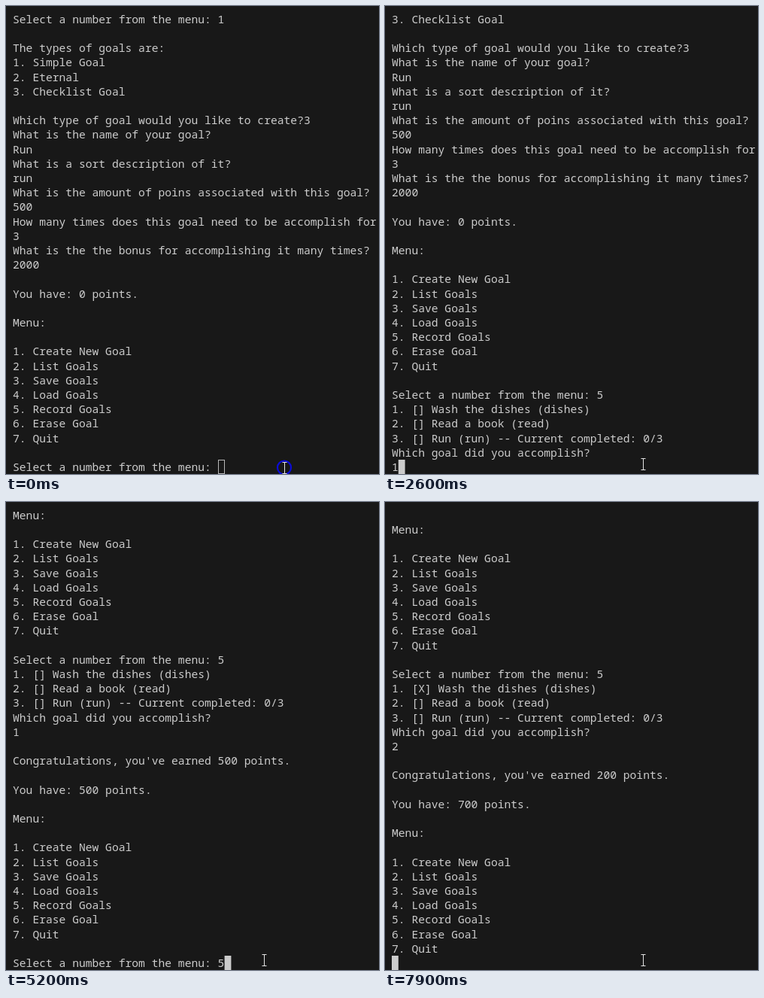
An HTML page with a canvas for the animation above (8000 ms loop, 496 by 622 pixels).

```html
<!DOCTYPE html>
<html lang="en">
<head>
<meta charset="utf-8">
<title>Goal tracker terminal</title>
<style>
  html, body { margin: 0; width: 100%; height: 100%; overflow: hidden; background: #181818; }
  canvas { display: block; }
</style>
</head>
<body>
<canvas id="stage" width="496" height="622"></canvas>
<script>
const ctx = document.getElementById('stage').getContext('2d');
const LOOP = 8000;
const ROWS = 32;
const LEFT = 9;
const CHAR = 8.8;
const LINE = 19.2;
const BASE = 22.8;
const PROMPT = 'Select a number from the menu: ';

const MENU = ['Menu:', '', '1. Create New Goal', '2. List Goals', '3. Save Goals',
  '4. Load Goals', '5. Record Goals', '6. Erase Goal', '7. Quit'];

const setup = [
  PROMPT + '1', '',
  'The types of goals are:', '1. Simple Goal', '2. Eternal', '3. Checklist Goal', '',
  'Which type of goal would you like to create?3',
  'What is the name of your goal?', 'Run',
  'What is a sort description of it?', 'run',
  'What is the amount of poins associated with this goal?', '500',
  'How many times does this goal need to be accomplish for', '3',
  'What is the the bonus for accomplishing it many times?', '2000', '',
  'You have: 0 points.', '', ...MENU, ''
];

const goals = mark => [
  `1. [${mark}] Wash the dishes (dishes)`, '2. [] Read a book (read)',
  '3. [] Run (run) -- Current completed: 0/3', 'Which goal did you accomplish?'
];

const reward = (earned, total) => [
  '', `Congratulations, you've earned ${earned} points.`, '',
  `You have: ${total} points.`, '', ...MENU
];

// Each step prints its output, then waits on a prompt until a key is typed.
const steps = [
  { at: 0, out: setup, prompt: PROMPT, key: '5', typed: 700 },
  { at: 1000, out: goals(''), prompt: '', key: '1', typed: 2000 },
  { at: 2700, out: [...reward(500, 500), ''], prompt: PROMPT, key: '5', typed: 4200 },
  { at: 5400, out: goals('X'), prompt: '', key: '2', typed: 7000 },
  { at: 7900, out: reward(200, 700), prompt: '', key: '', typed: LOOP }
];

function screenAt(t) {
  const lines = [];
  for (const s of steps) {
    if (t < s.at) break;
    if (lines.length) lines[lines.length - 1] = lines.input;
    lines.push(...s.out, s.prompt + (t >= s.typed ? s.key : ''));
    lines.input = s.prompt + s.key;
  }
  return lines.slice(-ROWS);
}

function drawCursor(column, focused) {
  const x = LEFT + column * CHAR;
  const y = 603;
  if (focused) {
    ctx.fillStyle = '#cccccc';
    ctx.fillRect(x, y, CHAR, 19);
  } else {
    ctx.strokeStyle = '#b8b8b8';
    ctx.lineWidth = 1;
    ctx.strokeRect(Math.round(x) + 0.5, y + 0.5, 8, 18);
  }
}

function drawPointer(t) {
  const p = Math.min(1, Math.max(0, (t - 100) / 500));
  const ease = p * p * (3 - 2 * p);
  const x = Math.round(370 - 27 * ease) + 0.5;
  const y = Math.round(614 - 5 * ease);

  if (t < 200) {
    ctx.strokeStyle = '#0c0cd8';
    ctx.lineWidth = 2.2;
    ctx.beginPath();
    ctx.arc(x - 0.5, y - 0.5, 9, 0, Math.PI * 2);
    ctx.stroke();
  }

  ctx.strokeStyle = '#e4e4e4';
  ctx.lineWidth = 1;
  ctx.beginPath();
  ctx.moveTo(x, y - 7);
  ctx.lineTo(x, y + 7);
  for (const end of [-7.5, 7.5]) {
    ctx.moveTo(x - 3, y + end);
    ctx.lineTo(x + 3, y + end);
  }
  ctx.stroke();
}

function draw(t) {
  ctx.fillStyle = '#181818';
  ctx.fillRect(0, 0, 496, 622);
  ctx.font = '14.667px "Noto Sans Mono", monospace';
  ctx.textBaseline = 'alphabetic';
  ctx.fillStyle = '#cccccc';
  const lines = screenAt(t);
  lines.forEach((text, row) => ctx.fillText(text, LEFT, BASE + row * LINE));
  drawCursor(lines[lines.length - 1].length, t >= 100);
  drawPointer(t);
}

function tick() {
  draw(performance.now() % LOOP);
  requestAnimationFrame(tick);
}
tick();
</script>
</body>
</html>
```
